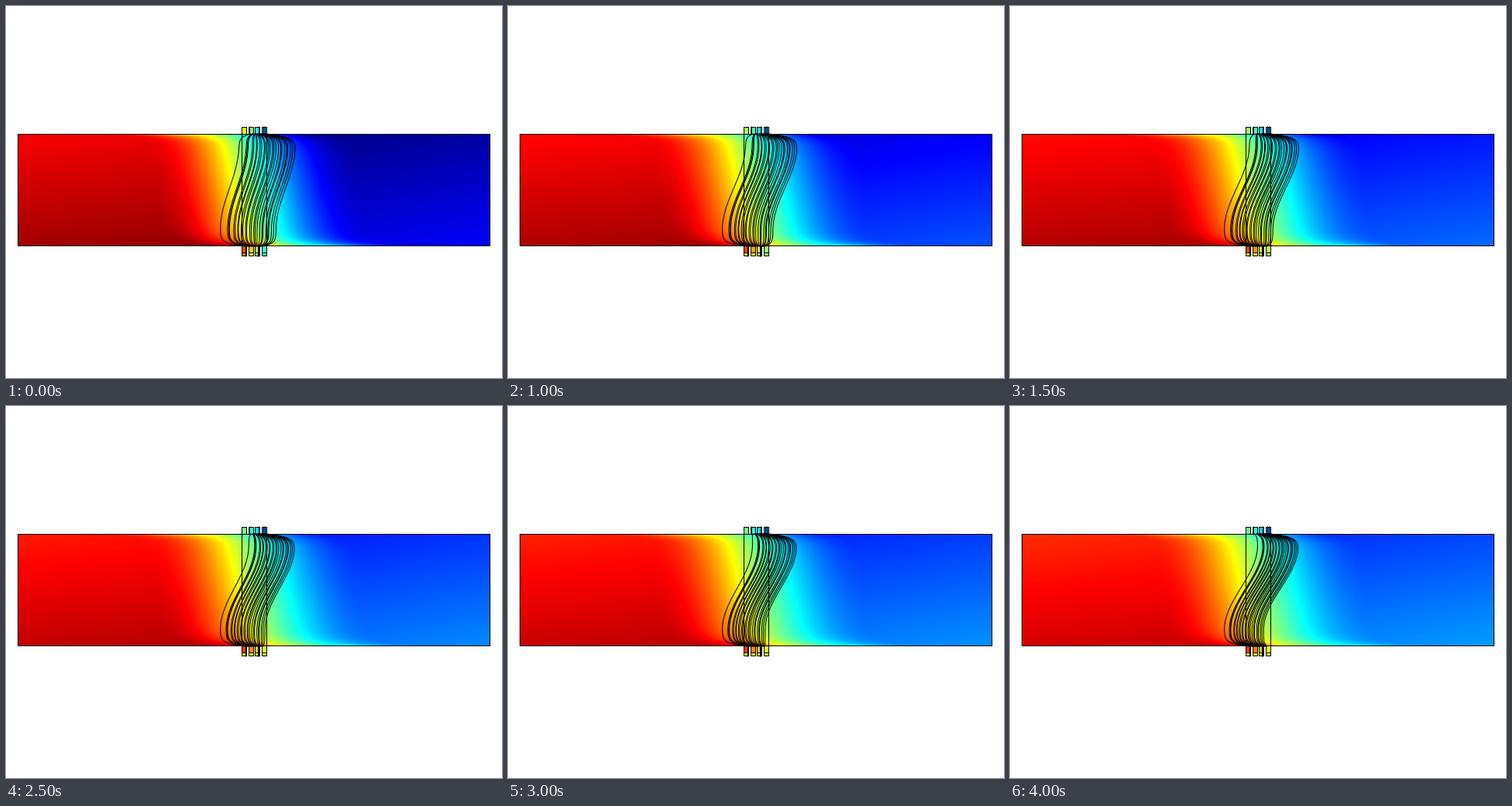
Recreate the animation shown at these times as a matplotlib script. Size 640 by 480 pixels, loop 4500 ms.

```python
import numpy as np
import matplotlib.pyplot as plt
from matplotlib.animation import FuncAnimation
from matplotlib.patches import Rectangle

W, H, DPI = 640, 480, 100
FRAMES, INTERVAL = 9, 500
X0, X1, Y0, Y1 = 15, 625, 165, 310
PX = 72 / DPI


def jet(v):
    v = np.asarray(v)[..., None]
    return np.clip(1.5 - np.abs(4 * v - np.array([3, 2, 1])), 0, 1)


def warming(k):
    return (1 - np.exp(-k / 2.9)) / (1 - np.exp(-8 / 2.9))


def mix(a, b, t):
    return a + (b - a) * t


xs = np.arange(X0, X1) + 0.5
s = np.linspace(0, 1, Y1 - Y0)[:, None]


def near_top(depth):
    return np.exp(-s / depth)


def near_bottom(depth):
    return np.exp((s - 1) / depth)


# Share of the hot side at each point: a tilted front with thin wall layers
center = 318 + 14 * (s - 0.5) - 18 * near_top(0.04) + 38 * near_bottom(0.04)
wide_l = 128 + 70 * near_top(0.02) - 28 * near_bottom(0.06)
wide_r = 147 + 60 * near_bottom(0.02) - 28 * near_top(0.06)
off = xs - center
front = 0.5 - 0.5 * np.sin(np.pi / 2 * np.clip(off / np.where(off < 0, wide_l, wide_r), -1, 1))


def temperature(k):
    left = 0.88 + 0.085 * s - 0.05 * k / 8 + 0.012 * (xs - X0) / 200
    right = 0.015 + 0.16 * warming(k) + 0.085 * s + 0.02 * (xs - 440) / 185
    return np.clip(mix(right, left, front), 0, 1)


def stream(p, k):
    """Flow line p (0 left, 1 right): an S-curve pulled in at both walls."""
    m = (k / 8) ** 0.85
    h = 0.5 - 0.5 * np.cos(np.linspace(0, np.pi, 90))
    upper = 300 + 19 * m + p * (72 - 20 * m)
    lower = 276 + p * (71 - 21 * m)
    ease = 0.5 - 0.5 * np.cos(np.pi * np.clip((h - 0.1) / 0.76, 0, 1))
    x = mix(upper, lower, ease)
    x += (315 + 20 * p - upper) * np.exp(-h / 0.027)
    x += (307 + 24 * p - lower) * np.exp((h - 1) / 0.025)
    return x + 0.5, mix(Y0, Y1, h)


fig = plt.figure(figsize=(W / DPI, H / DPI), dpi=DPI, facecolor="white")
ax = fig.add_axes([0, 0, 1, 1])
ax.set_xlim(0, W)
ax.set_ylim(H, 0)
ax.axis("off")


def line(x, y):
    return ax.plot(x, y, color="black", lw=PX, snap=False, zorder=4)[0]


def outline(x0, y0, x1, y1):
    line(np.array([x0, x1, x1, x0, x0]) + 0.5, np.array([y0, y0, y1, y1, y0]) + 0.5)


field = ax.imshow(jet(temperature(0)), extent=(X0, X1, Y1, Y0),
                  interpolation="nearest", aspect="auto", zorder=1)
outline(X0, Y0, X1 - 1, Y1 - 1)
for x in (304.5, 336.5):
    line([x, x], [Y0, Y1])

# Four tubes above and below; each row cools evenly from left to right
tubes = []


def tube_row(top, bottom, start, end):
    for i in range(4):
        x = 304 + round(26 / 3 * i)
        patch = Rectangle((x + 0.5, top + 0.5), 6, bottom - top, lw=0, snap=False, zorder=2)
        ax.add_patch(patch)
        outline(x, top, x + 6, bottom)
        tubes.append((patch, start[0] - start[1] * i, end[0] - end[1] * i))


tube_row(156, 165, (0.62, 0.11), (0.48, 0.07))
tube_row(309, 318, (0.80, 0.12), (0.82, 0.07))
tube_row(318, 322, (0.75, 0.11), (0.60, 0.0))

for x in (314.5, 326.5, 332.5, 334.5):
    line([x, x], [156, 166])
for x in (309.5, 325.5, 326.5):
    line([x, x], [309, 323])

rng = np.random.default_rng(4)
spread = np.linspace(0.23, 1, 22) + rng.uniform(-0.014, 0.014, 22)
places = [0, 0.13, 0.15, 0.165, *spread]
flow = [line([], []) for _ in places]


def draw(k):
    field.set_data(jet(temperature(k)))
    for patch, a, b in tubes:
        patch.set_facecolor(jet(mix(a, b, warming(k))))
    for item, p in zip(flow, places):
        item.set_data(*stream(p, k))
    return [field, *flow]


anim = FuncAnimation(fig, draw, frames=FRAMES, interval=INTERVAL,
                     init_func=lambda: draw(0), repeat=True, repeat_delay=0)
plt.show()
```
